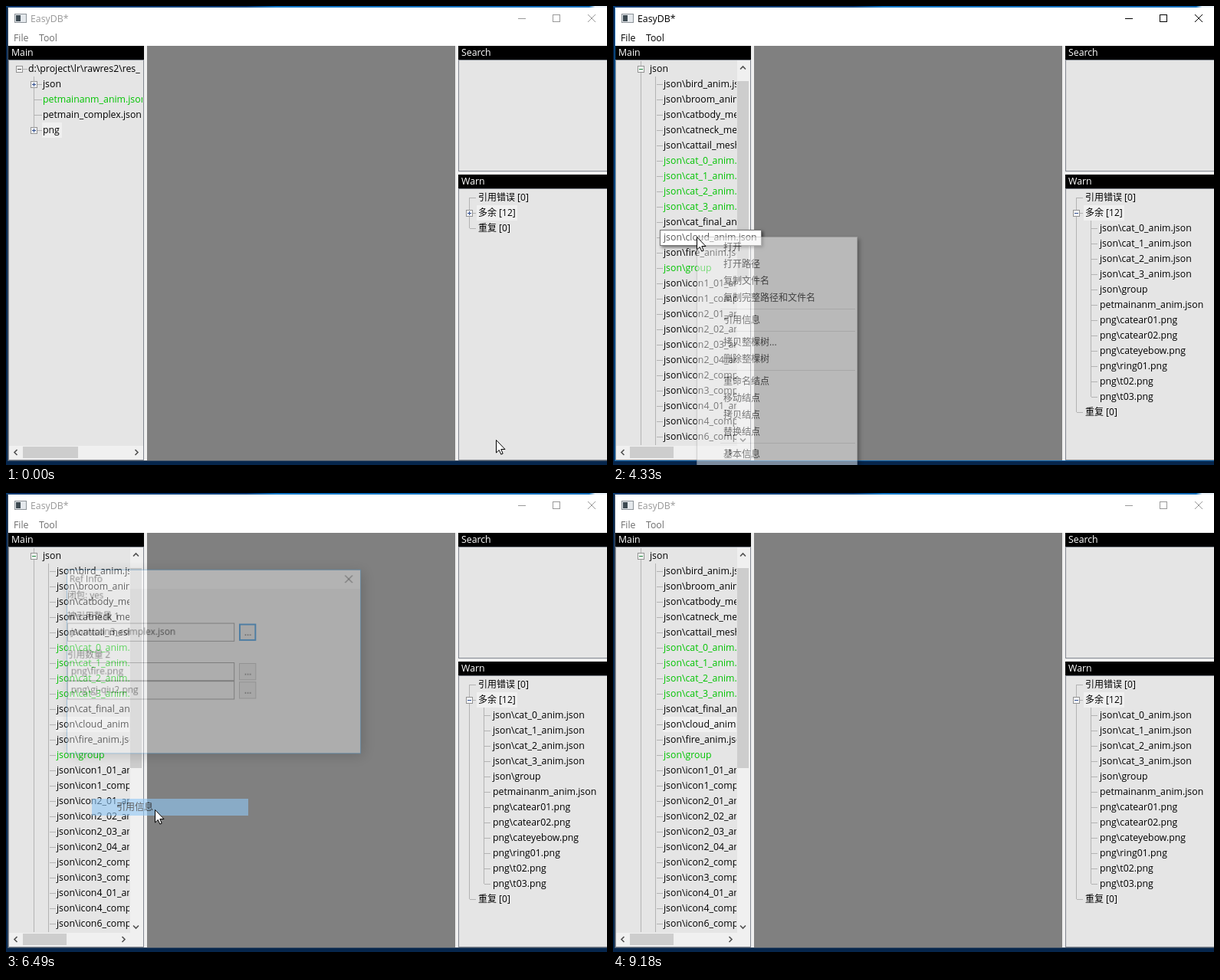
Animation, 784 px wide and 599 px high, one loop 9260 ms. Source, as an HTML page with a canvas:

```html
<!DOCTYPE html>
<html>
<head>
<meta charset="utf-8">
<style>
html, body { margin: 0; width: 784px; height: 599px; overflow: hidden; }
canvas { display: block; }
</style>
</head>
<body>
<canvas id="stage" width="784" height="599"></canvas>
<script>
const LOOP = 9260, STEP = 77.2, LAST = 119;
const FAMILY = '"Open Sans", "Noto Sans CJK SC", "Noto Sans CJK", "Noto Sans", sans-serif';
const GREEN = '#00c400', LIGHT = '#f0f0f0', PANEL = '#e5e5e5', EDGE = '#828790';

const main = document.getElementById('stage').getContext('2d');
const spare = Object.assign(document.createElement('canvas'), { width: 784, height: 599 }).getContext('2d');
let g = main;

const files = ['bird_anim', 'broom_anim', 'catbody_mesh', 'catneck_mesh', 'cattail_mesh',
  'cat_0_anim', 'cat_1_anim', 'cat_2_anim', 'cat_3_anim', 'cat_final_anim', 'cloud_anim',
  'fire_anim', 'group', 'icon1_01_anim', 'icon1_complex', 'icon2_01_anim', 'icon2_02_anim',
  'icon2_03_anim', 'icon2_04_anim', 'icon2_complex', 'icon3_complex', 'icon4_01_anim',
  'icon4_complex', 'icon6_complex'].map(n => 'json\\' + n + (n === 'group' ? '' : '.json'));
const unused = [...files.slice(5, 9), 'json\\group', 'petmainanm_anim.json',
  ...['catear01', 'catear02', 'cateyebow', 'ring01', 't02', 't03'].map(n => `png\\${n}.png`)];
const menu = [['打开', 315], ['打开路径', 337], ['复制文件名', 359], ['复制完整路径和文件名', 381],
  ['引用信息', 410], ['拷贝整棵树...', 439], ['删除整棵树', 461], ['重命名结点', 490],
  ['移动结点', 512], ['拷贝结点', 534], ['替换结点', 556], ['基本信息', 585]];

// Pointer path: step, x, y
const path = [[0, 639, 566], [2, 630, 551], [5, 330, 325], [8, 36, 119], [9, 37, 114], [10, 37, 114],
  [11, 37, 111], [12, 37, 111], [13, 37, 106], [16, 37, 105], [20, 37, 105], [22, 110, 178],
  [24, 599, 288], [25, 614, 297], [27, 612, 291], [31, 604, 266], [32, 604, 266], [34, 604, 264],
  [37, 604, 264], [39, 570, 262], [43, 240, 285], [46, 112, 300], [47, 109, 301], [62, 109, 301],
  [65, 130, 335], [70, 186, 470], [72, 192, 486], [73, 192, 486], [75, 192, 484], [78, 194, 416],
  [79, 194, 416], [81, 194, 413], [84, 194, 413], [86, 205, 400], [91, 380, 230], [95, 467, 127],
  [96, 463, 126], [98, 454, 122], [101, 454, 122], [104, 450, 118], [107, 450, 118],
  [109, 465, 180], [114, 520, 620], [120, 520, 620]];

const clamp = v => Math.max(0, Math.min(1, v));
const ramp = (f, a, b) => clamp((f - a) / (b - a));

function pointer(f) {
  const i = path.findIndex(p => p[0] > f);
  const [a, x, y] = path[i - 1], [b, u, v] = path[i], k = (f - a) / (b - a);
  return [Math.round(x + (u - x) * k), Math.round(y + (v - y) * k)];
}

function box(x, y, r, b, fill, edge) {
  if (fill) { g.fillStyle = fill; g.fillRect(x, y, r - x, b - y); }
  if (edge) { g.strokeStyle = edge; g.lineWidth = 1; g.strokeRect(x + .5, y + .5, r - x - 1, b - y - 1); }
}

const fontFor = s => `${/[一-龥]/.test(s) ? 12 : 12.3}px ${FAMILY}`;

function text(s, x, y, color = '#000') {
  g.font = fontFor(s);
  g.fillStyle = color;
  g.fillText(s, x, y);
}

function line(color, width, ...p) {
  g.strokeStyle = color;
  g.lineWidth = width;
  g.beginPath();
  for (let i = 0; i < p.length; i += 2) g.lineTo(p[i], p[i + 1]);
  g.stroke();
}

function dots(x, y, r, b) {
  g.setLineDash([1, 1]);
  line('#808080', 1, x + .5, y + .5, r + .5, b + .5);
  g.setLineDash([]);
}

function clipped(x, y, r, b, draw) {
  g.save();
  g.beginPath();
  g.rect(x, y, r - x, b - y);
  g.clip();
  draw();
  g.restore();
}

// Draws a group with a common opacity, scaled about (271, 220)
function layer(alpha, draw, scale = 1) {
  if (alpha <= 0) return;
  const base = g;
  g = spare;
  g.clearRect(0, 0, 784, 599);
  draw();
  g = base;
  g.save();
  g.globalAlpha = alpha;
  g.translate(271, 220);
  g.scale(scale, scale);
  g.drawImage(spare.canvas, -271, -220);
  g.restore();
}

function shadow(draw, blur, offset, strength = .55) {
  g.save();
  g.shadowColor = `rgba(0,0,0,${strength})`;
  g.shadowBlur = blur;
  g.shadowOffsetX = g.shadowOffsetY = offset;
  draw();
  g.restore();
}

function expander(x, y, open, color = '#2c4a8c') {
  box(x - 4, y - 4, x + 5, y + 5, '#fafafa', '#919191');
  box(x - 2, y, x + 3, y + 1, color);
  if (!open) box(x, y - 2, x + 1, y + 3, color);
}

function cross(x, y, r, color) {
  line(color, 1, x - r, y - r, x + r, y + r);
  line(color, 1, x + r, y - r, x - r, y + r);
}

function chevron(x, y, dx, dy) {
  line('#505050', 1.6, x - 1.5 * dx - 3.5 * dy, y - 1.5 * dy - 3.5 * dx, x + 2 * dx, y + 2 * dy,
    x - 1.5 * dx + 3.5 * dy, y - 1.5 * dy + 3.5 * dx);
}

function frameWindow(active) {
  const ink = active ? '#000' : '#999', menuInk = active ? '#000' : '#6d6d6d';
  box(0, 0, 784, 599, '#06264c');
  const top = g.createLinearGradient(0, 0, 784, 0);
  top.addColorStop(0, '#063a70');
  top.addColorStop(.4, '#06427c');
  top.addColorStop(.45, '#0878c8');
  top.addColorStop(.97, '#0a6cb8');
  top.addColorStop(.98, '#e8f0f8');
  box(0, 0, 784, 2, top);
  box(2, 1, 3, 594, active ? '#0a64ad' : '#46566a');
  box(2, 593, 784, 594, active ? '#0a64ad' : '#46566a');
  box(3, 2, 784, 593, LIGHT);
  box(3, 2, 784, 52, '#fff');
  box(11, 10, 27, 22, '#e4e8ec', '#8c9298');
  box(13, 12, 19, 20, '#3d4a52');
  text('EasyDB*', 32, 21, ink);
  text('File', 10, 46, menuInk);
  text('Tool', 43, 46, menuInk);
  box(668, 16, 678, 17, ink);
  box(713, 11, 723, 21, null, ink);
  cross(764, 16, 5, ink);

  box(184, 52, 586, 593, '#808080');
  for (const [x, y, r, b, name] of [[3, 52, 180, 593, 'Main'], [590, 52, 790, 216, 'Search'], [590, 220, 790, 593, 'Warn']]) {
    box(x, y, r, y + 18, '#000');
    box(x, y + 18, r, b, PANEL, EDGE);
    text(name, x + 4, y + 13, '#fff');
  }
}

function closedTree() {
  dots(22, 82, 27, 82);
  dots(36, 92, 36, 162);
  for (const y of [102, 122, 142, 162]) dots(37, y, 46, y);
  expander(17, 82, true, '#444');
  expander(36, 102, false);
  expander(36, 162, false);
  box(47, 152, 73, 172, LIGHT);
  clipped(4, 71, 178, 573, () => {
    text('d:\\project\\lr\\rawres2\\res_', 29, 86);
    text('json', 48, 106);
    text('petmainanm_anim.json', 48, 126, GREEN);
    text('petmain_complex.json', 48, 146);
    text('png', 48, 166);
  });
}

function openTree(f) {
  clipped(4, 71, 161, 573, () => {
    dots(36, 72, 36, 573);
    dots(55, 92, 55, 573);
    expander(36, 82, true, '#188038');
    text('json', 48, 86);
    files.forEach((name, i) => {
      const y = 102 + 20 * i, chosen = i === 10 && f > 56;
      dots(57, y, 64, y);
      if (chosen) box(65, y - 10, 161, y + 10, f < 83 ? '#0078d7' : LIGHT);
      const green = i > 4 && i < 9 || i === 12;
      text(name, 66, y + 4, chosen && f < 83 ? '#fff' : green ? GREEN : '#000');
    });
  });
  box(162, 71, 179, 574, LIGHT);
  box(162, 98, 177, 359, '#cdcdcd');
  chevron(169.5, 81, 0, -1);
  chevron(169.5, 566, 0, 1);
}

function mainPanel(f) {
  const open = f >= 13;
  open ? openTree(f) : closedTree();
  box(4, 574, 179, 592, LIGHT);
  box(22, 575, open ? 79 : 94, 590, '#cdcdcd');
  chevron(13, 582.5, -1, 0);
  chevron(open ? 153 : 170, 582.5, 1, 0);
}

function warnPanel(open) {
  const end = open ? 530 : 290;
  dots(604, 250, 604, end);
  for (const y of [250, 270, end]) dots(605, y, 613, y);
  expander(604, 270, open);
  box(614, 260, 667, 280, LIGHT);
  text('引用错误 [0]', 616, 254);
  text('多余 [12]', 616, 274);
  text('重复 [0]', 616, end + 4);
  if (!open) return;
  dots(623, 280, 623, 510);
  unused.forEach((name, i) => {
    dots(624, 290 + 20 * i, 632, 290 + 20 * i);
    text(name, 635, 294 + 20 * i);
  });
}

function tooltip(name, y) {
  g.font = fontFor(name);
  const r = Math.round(72 + g.measureText(name).width);
  shadow(() => box(61, y - 10, r, y + 11, '#fff'), 4, 2);
  box(61, y - 10, r, y + 11, null, '#767676');
  text(name, 66, y + 4, '#575757');
}

function highlight([label, y]) {
  box(112, y - 11, 316, y + 11, '#90c8f6');
  text(label, 144, y + 4);
}

function contextMenu([px, py]) {
  shadow(() => box(109, 301, 319, 620, '#f2f2f2'), 5, 3);
  box(109, 301, 319, 620, null, '#b4b4b4');
  for (const y of [395, 424, 475, 570]) box(140, y, 316, y + 1, '#d0d0d0');
  for (const item of menu) {
    if (px > 111 && Math.abs(py - item[1]) < 11) highlight(item);
    else text(item[0], 144, item[1] + 4);
  }
}

function field(name, y, focus) {
  box(74, y, 299, y + 25, '#efefef', '#7a7a7a');
  text(name, 79, y + 16);
  box(305, y + 1, 328, y + 24, '#e1e1e1', focus ? '#0078d7' : '#adadad');
  if (focus) box(306, y + 2, 327, y + 23, null, '#0078d7');
  text('...', 312, y + 17);
}

function dialog(f) {
  shadow(() => box(73, 96, 469, 344, LIGHT), 16, 3, .4);
  box(73, 96, 469, 122, '#fff');
  box(73, 96, 469, 344, null, '#3a8cc8');
  text('Ref Info', 77, 113);
  if (f < 106) {
    const hot = ramp(f, 101, 104);
    if (hot) box(437, 97, 468, 122, `rgba(232,17,35,${hot})`);
    cross(452.5, 109, 5, hot > .5 ? '#fff' : '#000');
  }
  text('闭包: yes', 74, 135);
  text('被引用数量 1', 74, 163);
  field('json\\icon3_complex.json', 168, true);
  text('引用数量 2', 74, 215);
  field('png\\fire.png', 221);
  field('png\\gj-qiu2.png', 246);
}

function arrow([x, y]) {
  const p = [0, 0, 0, 16.5, 3.8, 13, 6.3, 18.6, 8.7, 17.6, 6.3, 12, 11.5, 12];
  g.beginPath();
  for (let i = 0; i < p.length; i += 2) g.lineTo(x + .5 + p[i], y + .5 + p[i + 1]);
  g.closePath();
  g.fillStyle = '#fff';
  g.fill();
  g.strokeStyle = '#000';
  g.lineWidth = 1;
  g.stroke();
}

function draw(f) {
  const tip = pointer(f);
  frameWindow(f >= 13 && f < 83 || f >= 106 && f < LAST);
  mainPanel(f);
  warnPanel(f >= 37);
  if (f >= 22 && f < 25) layer(1 - (f - 22) * .3, () => tooltip(files[4], 182));
  if (f < 57) layer(ramp(f, 46, 49), () => tooltip(files[10], 302));
  if (f < 83) layer(ramp(f, 55, 57), () => contextMenu(tip));
  else layer(1 - ramp(f, 83, 85.5), () => highlight(menu[4]));
  const shown = Math.min(ramp(f, 83, 85.5), 1 - ramp(f, 107, 109));
  layer(shown, () => dialog(f), .95 + .05 * shown);
  arrow(tip);
}

const start = performance.now();
function tick() {
  const t = (performance.now() - start) % LOOP;
  draw(Math.min(LAST, Math.floor((t + 10) / STEP)));
  requestAnimationFrame(tick);
}
tick();
</script>
</body>
</html>
```
